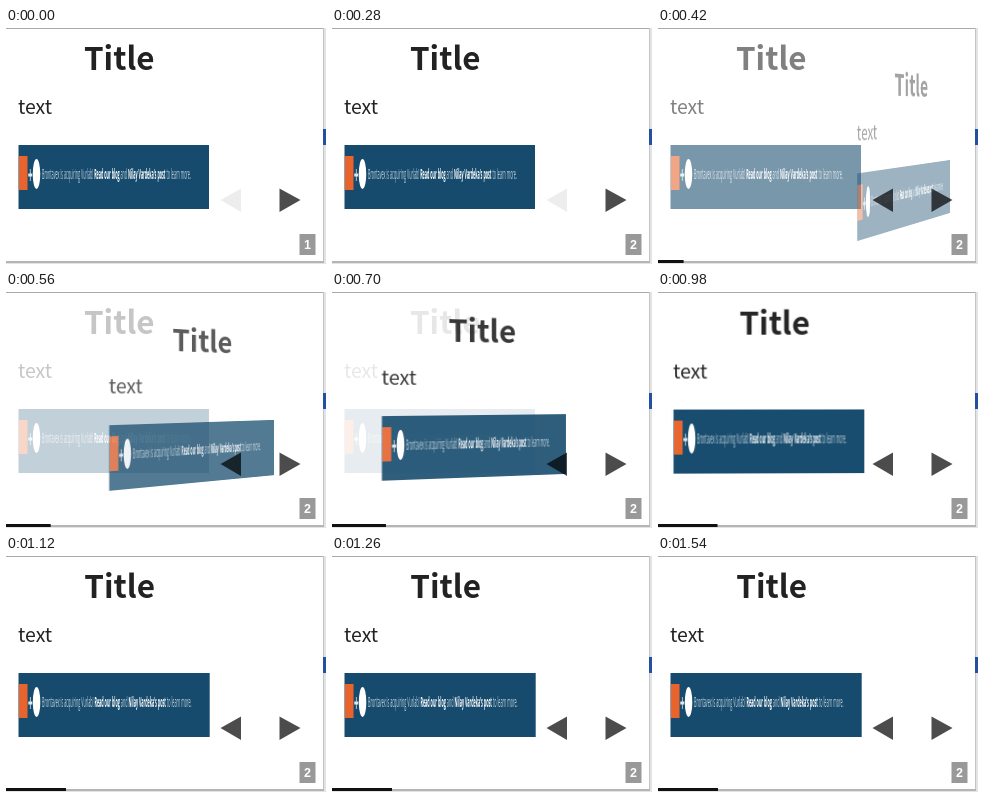
Animation of 320x236 px, one loop 1610 ms. Source, as an HTML page:

```html
<!DOCTYPE html>
<html lang="en">
<head>
<meta charset="utf-8">
<title>Slide transition</title>
<style>
html, body { margin: 0; width: 100%; height: 100%; overflow: hidden; background: #fff; }
#stage { position: relative; width: 320px; height: 236px; overflow: hidden; }
svg { position: absolute; left: 0; top: 0; width: 320px; height: 236px; transform-origin: 0 0; }
text { font-family: "Noto Sans CJK JP", "Noto Sans CJK SC", "Noto Sans", sans-serif; fill: #222; }
.banner text { font: 14.8px "Open Sans", sans-serif; fill: #c3d3dd; }
.banner .bold { font-weight: 700; fill: #fff; }
#number { font: bold 12.5px "Liberation Sans", Arial, sans-serif; fill: #fff; text-anchor: middle; }
</style>
</head>
<body>
<div id="stage">
  <svg class="slide">
    <text x="78" y="42" font-size="31.4" font-weight="600">Title</text>
    <text x="12" y="86" font-size="19.4">text</text>
    <!-- the banner is squeezed to a quarter of its width -->
    <g class="banner" transform="translate(12.5 117) scale(.25 1)">
      <rect width="762" height="64" fill="#164b6d"/>
      <rect x="2" y="11" width="34" height="34" fill="#e8642c"/>
      <path d="M39 30h16M47 24v12" stroke="#dfe8ee" stroke-width="3"/>
      <circle cx="72" cy="29" r="15" fill="#fff"/>
      <text x="94" y="34">Brontavex is acquiring Vurlab! <tspan class="bold">Read our blog</tspan> and <tspan class="bold">Nilay Vardeka's post</tspan> to learn more.</text>
    </g>
  </svg>
  <svg id="chrome">
    <path d="M0 .5H318" stroke="#aaa"/>
    <rect x="317" width="3" height="236" fill="#e2e3e6"/>
    <path d="M317.5 0V234" stroke="#c4c4c4"/>
    <rect x="317" y="101" width="3" height="16" fill="#2450a0"/>
    <rect y="233" width="318" height="2" fill="#b5b5b5"/>
    <rect y="235" width="320" height="1" fill="#e4e4e4"/>
    <rect id="bar" y="232" height="3" fill="#111"/>
    <path id="prev" d="M235 160.5V184L214.5 172Z" fill-opacity=".7"/>
    <path d="M273.5 160.5V184L294.5 172Z" fill-opacity=".7"/>
    <rect x="293.5" y="206" width="16" height="21" fill="#999"/>
    <text id="number" x="301.5" y="221">1</text>
  </svg>
</div>
<script>
const LOOP = 1610, STEP = 70, START = 302, DURATION = 800;
const $ = id => document.getElementById(id);
const leaving = document.querySelector('.slide');
const entering = leaving.cloneNode(true);
leaving.after(entering);

const clamp = v => Math.max(0, Math.min(1, v));
const bezier = (u, a, b) => 3 * (1 - u) ** 2 * u * a + 3 * (1 - u) * u * u * b + u ** 3;

function ease(x) {
  let lo = 0, hi = 1;
  for (let i = 0; i < 24; i++) {
    const mid = (lo + hi) / 2;
    if (bezier(mid, .26, .44) < x) lo = mid; else hi = mid;
  }
  return bezier(lo, .86, .985);
}

// Perspective that carries the banner's left and right edges to their swung places.
function swing(q) {
  const x0 = 12.5, x1 = 203, y = 149;
  const left = { x: x0 + q * (380 - 95 * q), y: y + q * (78 - 44 * q), w: 1 / (1 + .1 * q) };
  const right = { x: x1 + .7 + q * (330 - 306 * q), y: y + q * (33 - 29 * q), w: 1 / (1 - q * (.72 - .73 * q)) };
  const line = (p0, p1) => {
    const slope = (p1 - p0) / (x1 - x0);
    return [slope, p0 - slope * x0];
  };
  const [a, c] = line(left.x * left.w, right.x * right.w);
  const [d, f] = line(left.y * left.w - y, right.y * right.w - y);
  const [g, h] = line(left.w, right.w);
  const m = [a, d, 0, g, 0, 1, 0, 0, 0, 0, 1, 0, c, f, 0, h].map(v => v.toFixed(7));
  return { transform: `matrix3d(${m})`, facing: right.x > left.x };
}

function draw(time) {
  const t = Math.floor(time % LOOP / STEP) * STEP;
  const p = t <= START ? 0 : ease(clamp((t - START) / DURATION));
  const { transform, facing } = swing(1 - p);
  entering.style.transform = facing ? transform : 'none';
  entering.style.opacity = facing ? p : 0;
  leaving.style.opacity = 1 - p;
  $('bar').setAttribute('width', 60 * p);
  $('prev').style.opacity = .1 + .9 * clamp((t - START) / 118);
  $('number').textContent = t < 250 ? 1 : 2;
}

function tick() {
  draw(performance.now());
  requestAnimationFrame(tick);
}
tick();
</script>
</body>
</html>
```
